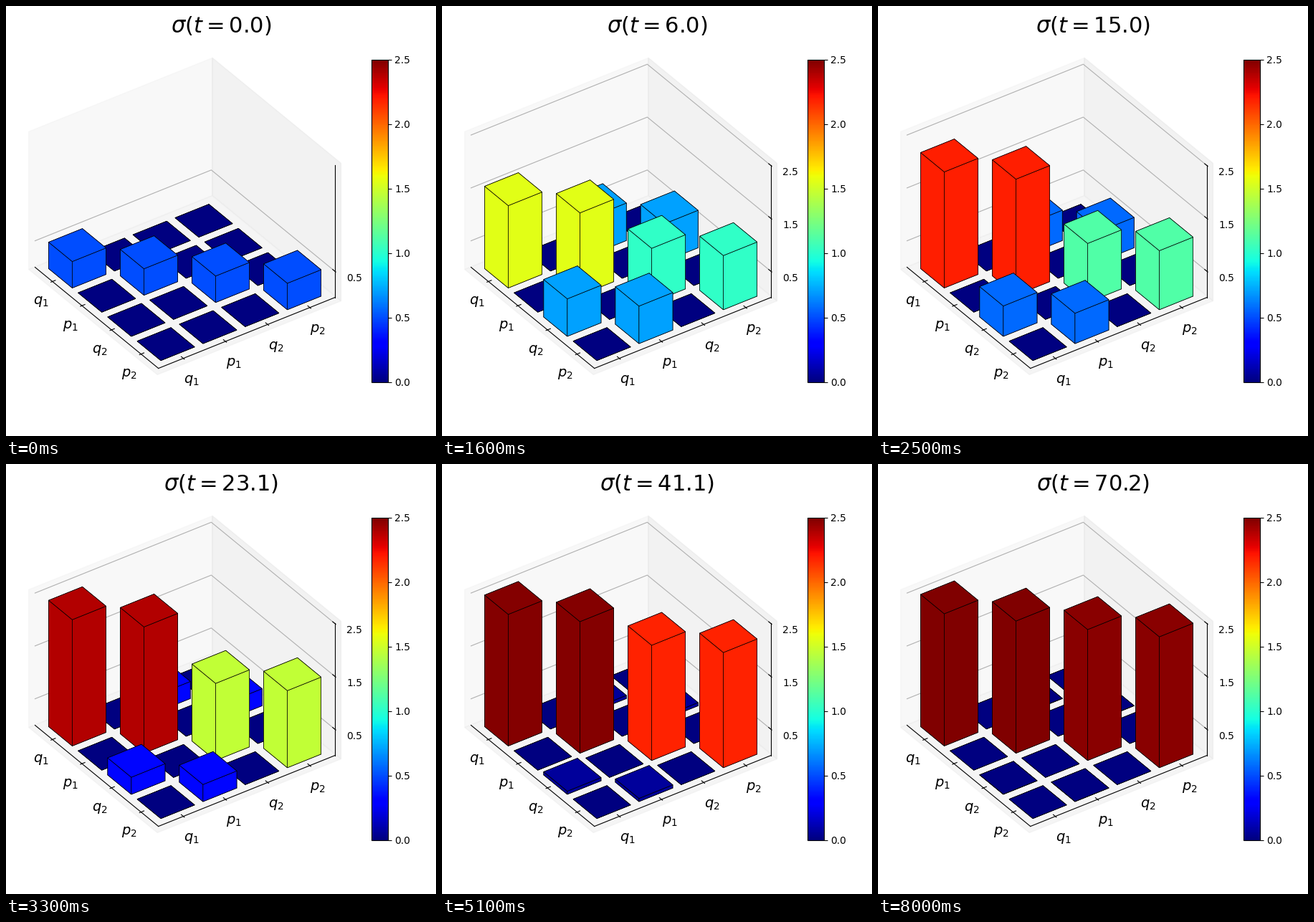
A matplotlib script that plays this animation: 600x600 px, repeating every 8.5 s.

```python
import numpy as np
import matplotlib.pyplot as plt
from matplotlib.animation import FuncAnimation
from matplotlib.cm import ScalarMappable
from matplotlib.collections import PolyCollection
from matplotlib.colors import Normalize

SIZE, DPI = 600, 100
FRAMES, INTERVAL = 85, 100
HOLD, STEPS = 10, 70           # still frames at the start, moving steps
DT = 400 / 399                 # simulated time per step
KAPPA, N_TH = 0.125, 2.0       # decay rate, thermal occupation

# Orthographic view: elevation 35 degrees, azimuth -35 degrees, box 4:4:3
BAR, MARGIN, Z_MAX = 0.8, 0.19, 2.5
SPAN = 3 + BAR + 2 * MARGIN
WIDTH = 300.24                 # floor side in pixels before rotation
CENTER = np.array([249.57, 293.43])
COS, SIN = np.cos(np.radians(35)), np.sin(np.radians(35))
AX_X = WIDTH / SPAN * np.array([SIN, COS * SIN])
AX_Y = WIDTH / SPAN * np.array([COS, -SIN * SIN])
AX_Z = np.array([0, -0.75 * WIDTH / Z_MAX * COS])
ORIGIN = CENTER - SPAN / 2 * (AX_X + AX_Y) - Z_MAX / 2 * AX_Z

# Distance of tick labels from their axis, in data units
PAD, Z_PAD = 0.789 * SPAN / 12, 0.789 * Z_MAX / 12

LABELS = ["$q_1$", "$p_1$", "$q_2$", "$p_2$"]
LEVELS = [0.5, 1.5, 2.5]
CMAP, NORM = plt.get_cmap("jet"), Normalize(0, Z_MAX)


def project(x, y, z):
    return ORIGIN + x * AX_X + y * AX_Y + z * AX_Z


def covariance(t):
    """Two cascaded modes, vacuum at first, fed by one thermal bath."""
    k = KAPPA * t
    decay = N_TH * np.exp(-k)
    cross = k * decay
    modes = [[N_TH + 0.5 - decay, cross],
             [cross, N_TH + 0.5 - decay * (1 + k * k)]]
    return np.kron(modes, np.eye(2))


def box_faces(x, y, h):
    """Six faces of one bar, hidden ones first."""
    a, b = x + BAR, y + BAR
    low = [project(*p, 0) for p in ((x, y), (a, y), (a, b), (x, b))]
    top = [p + h * AX_Z for p in low]
    side = lambda m, n: [low[m], low[n], top[n], top[m]]
    return [low, side(3, 0), side(2, 3), side(0, 1), side(1, 2), top]


fig = plt.figure(figsize=(SIZE / DPI, SIZE / DPI), dpi=DPI, facecolor="white")
ax = fig.add_axes([0, 0, 1, 1])
ax.set(xlim=(0, SIZE), ylim=(SIZE, 0))
ax.axis("off")


def line(*points, color="black", zorder=2):
    xs, ys = zip(*points)
    return ax.plot(xs, ys, color=color, lw=0.8, zorder=zorder)[0]


def tick(x, y, z, axis):
    p = project(x, y, z)
    return line(p - SPAN / 60 * axis, p + SPAN / 120 * axis)


def label(x, y, z, text, size):
    return ax.text(*project(x, y, z), text, size=size, ha="center", va="top")


# Panes reach a little past the axis box
lo, hi, zlo, zhi = -SPAN / 48, SPAN * 49 / 48, -Z_MAX / 48, Z_MAX * 49 / 48
panes = [
    (0.95, [(lo, lo, zlo), (lo, hi, zlo), (lo, hi, zhi), (lo, lo, zhi)]),
    (0.90, [(lo, hi, zlo), (hi, hi, zlo), (hi, hi, zhi), (lo, hi, zhi)]),
    (0.925, [(lo, lo, zlo), (hi, lo, zlo), (hi, hi, zlo), (lo, hi, zlo)]),
]
for grey, corners in panes:
    ax.add_patch(plt.Polygon([project(*c) for c in corners], color=(grey,) * 3,
                             alpha=0.5, lw=1, zorder=0))

# Axis lines, ticks and labels
line(project(0, 0, 0), project(SPAN, 0, 0))
line(project(SPAN, 0, 0), project(SPAN, SPAN, 0))
line(project(SPAN, SPAN, 0), project(SPAN, SPAN, Z_MAX))
for n, name in enumerate(LABELS):
    pos = MARGIN + n + BAR / 2
    tick(pos, 0, 0, -AX_Y)
    tick(SPAN, pos, 0, AX_X)
    label(pos, -PAD, -Z_PAD, name, 14)
    label(SPAN + PAD, pos, -Z_PAD, name, 14)

z_marks = []
for z in LEVELS:
    z_marks.append([
        line(project(0, 0, z), project(0, SPAN, z), project(SPAN, SPAN, z),
             color="#b0b0b0", zorder=1),
        tick(SPAN, SPAN, z, AX_X),
        label(SPAN + PAD, SPAN + PAD, z, f"{z}", 10),
    ])

bars = PolyCollection([], edgecolors="black", linewidths=0.5, zorder=3)
ax.add_collection(bars, autolim=False)
title = ax.text(300, 37, "", size=22, ha="center", va="baseline")

cax = fig.add_axes([0.85, 0.125, 0.0375, 0.75])
fig.colorbar(ScalarMappable(NORM, CMAP), cax=cax, ticks=np.arange(0, 2.6, 0.5))


def update(i):
    t = np.clip(i - HOLD, 0, STEPS) * DT
    sigma = covariance(t)
    faces, colors = [], []
    for m in range(4):
        for n in reversed(range(4)):
            h = sigma[m, n]
            faces += box_faces(m + MARGIN, n + MARGIN, h)
            colors += [CMAP(NORM(h))] * 6
    bars.set_verts(faces)
    bars.set_facecolor(colors)
    for z, marks in zip(LEVELS, z_marks):
        for mark in marks:
            mark.set_visible(z < sigma.max() + 1)
    title.set_text(rf"$\sigma(t={t:.1f})$")
    return [bars, title]


anim = FuncAnimation(fig, update, frames=FRAMES, interval=INTERVAL,
                     init_func=lambda: update(0), repeat=True, repeat_delay=0)
plt.show()
```
